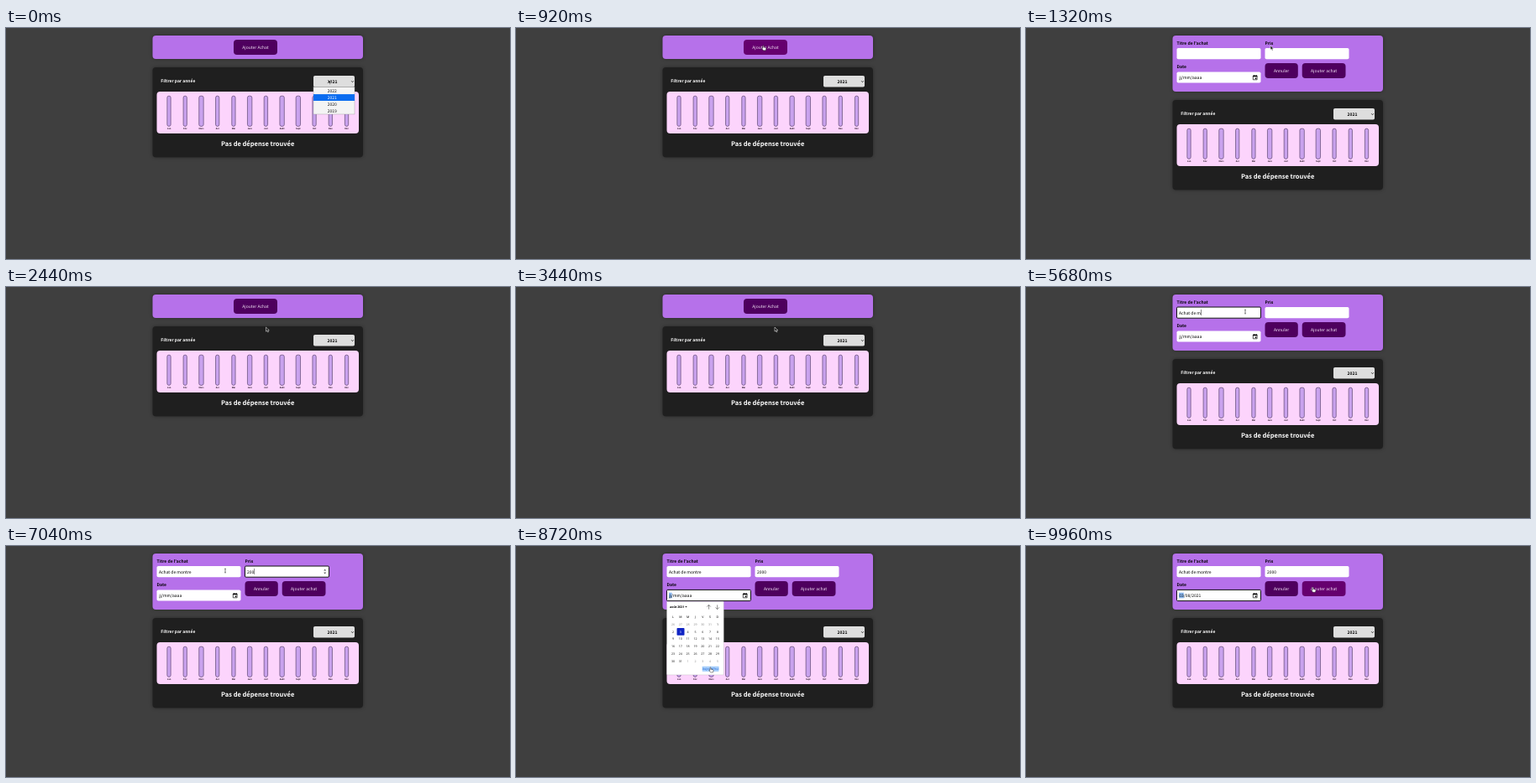
These frames come from a looping animation (600x276 px, 10 s). An HTML page:

```html
<!DOCTYPE html>
<html lang="fr">
<head>
<meta charset="utf-8">
<title>Dépenses</title>
<style>
  html, body { margin: 0; width: 100%; height: 100%; overflow: hidden; background: #3f3f3f; }
  svg { display: block; width: 100%; height: 100%; }
  text { font: 5px "Noto Sans CJK JP", "Noto Sans CJK SC", "Noto Sans", sans-serif; text-rendering: geometricPrecision; white-space: pre; }
  .bold { font-weight: 700; }
  .mid { text-anchor: middle; }
  .title { font-size: 7.5px; fill: #fff; }
  .month { font-size: 2.5px; fill: #201020; }
  .light { fill: #f3e6f6; }
  .cal text { font: 3.6px "Noto Sans", sans-serif; }
  .cal .bold { font-weight: 700; }
  .card { filter: drop-shadow(0 .6px 2px rgba(0, 0, 0, .35)); }
</style>
</head>
<body>
<svg id="stage" viewBox="0 0 600 276" xmlns="http://www.w3.org/2000/svg"></svg>
<script>
const LOOP = 10000;
const PURPLE = '#b671ea', BUTTON = '#4e005e', HOVER = '#66006f';

const rect = (x, y, w, h, fill, r = 0, extra = '') =>
  `<rect x="${x}" y="${y}" width="${w}" height="${h}" rx="${r}" fill="${fill}" ${extra}/>`;
const text = (x, y, content, cls = '', extra = '') =>
  `<text x="${x}" y="${y}" class="${cls}" ${extra}>${content}</text>`;
const line = (d, color, width) =>
  `<path d="${d}" fill="none" stroke="${color}" stroke-width="${width}"/>`;
const button = (id, x, y, w, label) =>
  rect(x, y, w, 18, BUTTON, 4, `id="${id}"`) + text(x + w / 2, y + 10.9, label, 'mid light');
const input = (id, x, y) =>
  rect(x, y, 100, 13.2, '#fff', 1.8) +
  rect(x, y, 100, 13.2, 'none', 1.2, `id="${id}Ring" stroke="#101010" stroke-width="1"`);
const caret = id => rect(0, 26.9, .5, 7, '#111', 0, `id="${id}"`);

function chart() {
  const months = ['Jan', 'Fév', 'Mars', 'Avr', 'Mai', 'Juin', 'Juil', 'Août', 'Sept', 'Oct', 'Nov', 'Déc'];
  return months.map((name, i) => {
    const x = 194 + i * 19.23;
    const w = name === 'Juil' ? 4.4 : name.length > 3 ? 5.4 : 4.3;
    return rect(x - w / 2, 81.2, w, 36.2, '#c9a2ee', 2.1, 'stroke="#49355c" stroke-width=".6"') +
      text(x, 120.8, name, 'mid bold month');
  }).join('');
}

function calendar() {
  const col = i => 187 + i * 8.82, row = i => 94.8 + i * 8.78;
  let out = rect(179.5, 66.3, 67.8, 87.6, '#fff', .8, 'stroke="#aaa" stroke-width=".3"') +
    text(183, 74, 'août 2021', 'bold') +
    '<path d="M201.2 72h2.6l-1.3 1.6z" fill="#222"/>' +
    line('M229.6 75.6V70.4m-2.2 2.2 2.2-2.2 2.2 2.2M239.7 70.4v5.2m-2.2-2.2 2.2 2.2 2.2-2.2', '#444', .6);
  [...'LMMJVSD'].forEach((d, i) => out += text(col(i), 86.3, d, 'mid'));
  out += rect(191.5, 98.1, 9, 8.6, '#1024c4', .8);
  for (let i = 0; i < 42; i++) {
    const n = i - 5;
    const day = n < 1 ? n + 31 : n > 31 ? n - 31 : n;
    const color = n === 3 ? '#fff' : n < 1 || n > 31 ? '#929292' : '#222';
    out += text(col(i % 7), row(Math.floor(i / 7)), day, 'mid', `fill="${color}"`);
  }
  return out + rect(221.7, 143.7, 19.8, 6.2, '#a9d0fb', .6, 'id="todayBg"') +
    text(231.6, 148.2, "Aujourd'hui", 'mid', 'fill="#1a62d6"');
}

const dropdown = rect(366, 70.5, 49, 32.5, '#f4f4f4', 0, 'stroke="#999" stroke-width=".4"') +
  rect(366, 79.1, 49, 7.9, '#0b6cf0') +
  [2022, 2021, 2020, 2019].map((year, i) =>
    text(388.3, 77 + i * 7.9, year, 'mid', `fill="${i === 1 ? '#fff' : '#111'}"`)).join('');

const form = rect(174.5, 9, 250.5, 67, PURPLE, 4, 'class="card"') +
  text(179.5, 19.6, "Titre de l'achat", 'bold') + text(284.5, 19.6, 'Prix', 'bold') + text(179.5, 48, 'Date', 'bold') +
  input('title', 179.5, 24) + input('price', 284.5, 24) + input('date', 179.5, 52.4) +
  text(182, 32.5, '', '', 'id="titleText"') + text(287, 32.5, '', '', 'id="priceText"') +
  caret('titleCaret') + caret('priceCaret') +
  '<path id="spinner" d="M378.3 29.6h2.8l-1.4-2zM378.3 31.6h2.8l-1.4 2z" fill="#555"/>' +
  rect(182, 55.7, 5.6, 6.6, '#8dbcf6', 0, 'id="datePart"') +
  text(182.2, 61, '', '', 'id="dateText"') +
  '<path d="M270.3 57h4.8v4.8h-4.8z" fill="none" stroke="#111" stroke-width=".7"/><path d="M270.3 57h4.8v1.3h-4.8zM272.9 59.6h1.4v1.4h-1.4zM271 56h.7v1h-.7zM273.7 56h.7v1h-.7z"/>' +
  button('cancel', 284.5, 42, 39.3, 'Annuler') + button('submit', 328.7, 42, 51.8, 'Ajouter achat');

const stage = document.getElementById('stage');
stage.innerHTML = rect(0, 0, 600, 276, '#3f3f3f') +
  `<g id="closed">${rect(174.5, 9, 250.5, 28, PURPLE, 4, 'class="card"')}${button('add', 271, 14, 52, 'Ajouter Achat')}</g>
  <g id="form">${form}</g>
  <g id="panel">
    ${rect(174.5, 47, 250.5, 107.6, '#1f1f1f', 4, 'class="card"')}
    ${text(184.3, 64.9, 'Filtrer par année', 'bold', 'fill="#fff"')}
    ${rect(366, 57, 49, 13.6, '#dedede', 1.8)}
    ${text(388.5, 65.9, '2021', 'bold mid')}
    ${line('M411.2 63.3l1.3 1.4 1.3-1.4', '#111', .8)}
    ${rect(179.5, 76, 240.5, 50, '#fcd4fc', 4)}${chart()}
    ${text(299.7, 141.1, 'Pas de dépense trouvée', 'title bold mid')}
    <g id="dropdown">${dropdown}</g>
  </g>
  <g id="calendar" class="cal">${calendar()}</g>
  <g id="cursor">
    <path id="arrow" d="M0 0V5.1L1.2 4 2 5.9 3 5.5 2.2 3.7H3.8Z" fill="#151515" stroke="#fff" stroke-width=".5"/>
    <path id="ibeam" d="M-.9-2.5Q0-2.5 0-1.9Q0-2.5.9-2.5M0-1.9V1.9M-.9 2.5Q0 2.5 0 1.9Q0 2.5.9 2.5" fill="none" stroke="#222" stroke-width=".6"/>
    <path id="hand" d="M-.5-.2Q0-.8.5-.2V1.7L2.8 2.2Q3.6 2.4 3.5 3.2L3 5.5H.1L-1.7 3.2Q-1.6 2.3-.5 3Z" fill="#fff" stroke="#111" stroke-width=".45"/>
  </g>`;

const el = {};
stage.querySelectorAll('[id]').forEach(node => el[node.id] = node);
const show = (id, on) => el[id].style.display = on ? '' : 'none';
const inside = (p, x, y, w, h) => p.x >= x && p.x <= x + w && p.y >= y && p.y <= y + h;

// Pointer stops: time, x, y
const stops = [
  [0, 383.5, 61.5], [120, 383.5, 61.5], [280, 388, 82], [400, 388, 82], [960, 293, 20.5],
  [1360, 291, 21], [1720, 309.5, 48], [2440, 309.5, 48], [2720, 294, 22], [2960, 294, 22],
  [3280, 308, 48], [3440, 308, 48], [3760, 294, 22], [3920, 294, 22], [4240, 261, 29.5],
  [7580, 261, 29.5], [8000, 272, 58.5], [8200, 272, 58.5], [8640, 231.5, 145.5],
  [9200, 232, 145.5], [9760, 341.5, 49.8], [LOOP, 341.5, 49.8]
];
function pointer(t) {
  const i = stops.findIndex(s => s[0] > t);
  const [t0, x0, y0] = stops[i - 1], [t1, x1, y1] = stops[i];
  const u = (t - t0) / (t1 - t0), k = u * u * (3 - 2 * u);
  return { x: x0 + (x1 - x0) * k, y: y0 + (y1 - y0) * k };
}

const toggles = [1080, 1800, 2760, 3400, 3880];
const titleKeys = [4520, 4700, 4880, ...Array.from({ length: 11 }, (_, i) => 5040 + i * 100), 6080];
const priceKeys = [6800, 6920, 7040, 7240];

function field(id, value, keys, t, from, to) {
  const typed = keys.filter(k => k <= t);
  const focused = t >= from && t < to;
  const last = typed.length ? typed[typed.length - 1] : from;
  el[id + 'Text'].textContent = value.slice(0, typed.length);
  show(id + 'Ring', focused);
  show(id + 'Caret', focused && (t - last) % 1000 < 500);
  const start = +el[id + 'Text'].getAttribute('x');
  el[id + 'Caret'].setAttribute('x', start + .2 + (typed.length ? el[id + 'Text'].getComputedTextLength() : 0));
}

function render(t) {
  const open = toggles.filter(k => k <= t).length % 2 === 1;
  const picking = t >= 8160 && t < 9200;
  const p = pointer(t);

  show('closed', !open);
  show('form', open);
  show('dropdown', t < 360);
  show('calendar', picking);
  el.panel.setAttribute('transform', `translate(0 ${open ? 39 : 0})`);

  if (open) {
    field('title', 'Achat de montre', titleKeys, t, 4280, 6240);
    field('price', '2000', priceKeys, t, 6240, 8160);
    show('spinner', t >= 6240 && t < 8160);
    show('dateRing', t >= 8160);
    show('datePart', t >= 8160);
    el.datePart.setAttribute('width', t < 9200 ? 3.6 : 5.8);
    el.dateText.textContent = t < 9200 ? 'jj/mm/aaaa' : '03/08/2021';
  }

  const over = {
    add: !open && inside(p, 271, 14, 52, 18),
    cancel: open && inside(p, 284.5, 42, 39.3, 18),
    submit: open && inside(p, 328.7, 42, 51.8, 18)
  };
  for (const id in over) el[id].setAttribute('fill', over[id] ? HOVER : BUTTON);
  const today = picking && inside(p, 221, 143, 21, 8);
  show('todayBg', today);

  const hand = today || over.add || over.cancel || over.submit;
  const ibeam = open && (inside(p, 179.5, 24, 100, 13) || inside(p, 284.5, 24, 100, 13));
  show('hand', hand);
  show('ibeam', !hand && ibeam);
  show('arrow', !hand && !ibeam);
  el.cursor.setAttribute('transform', `translate(${p.x} ${p.y})`);
}

const begin = performance.now();
function tick() {
  render((performance.now() - begin) % LOOP);
  requestAnimationFrame(tick);
}
tick();
</script>
</body>
</html>
```
